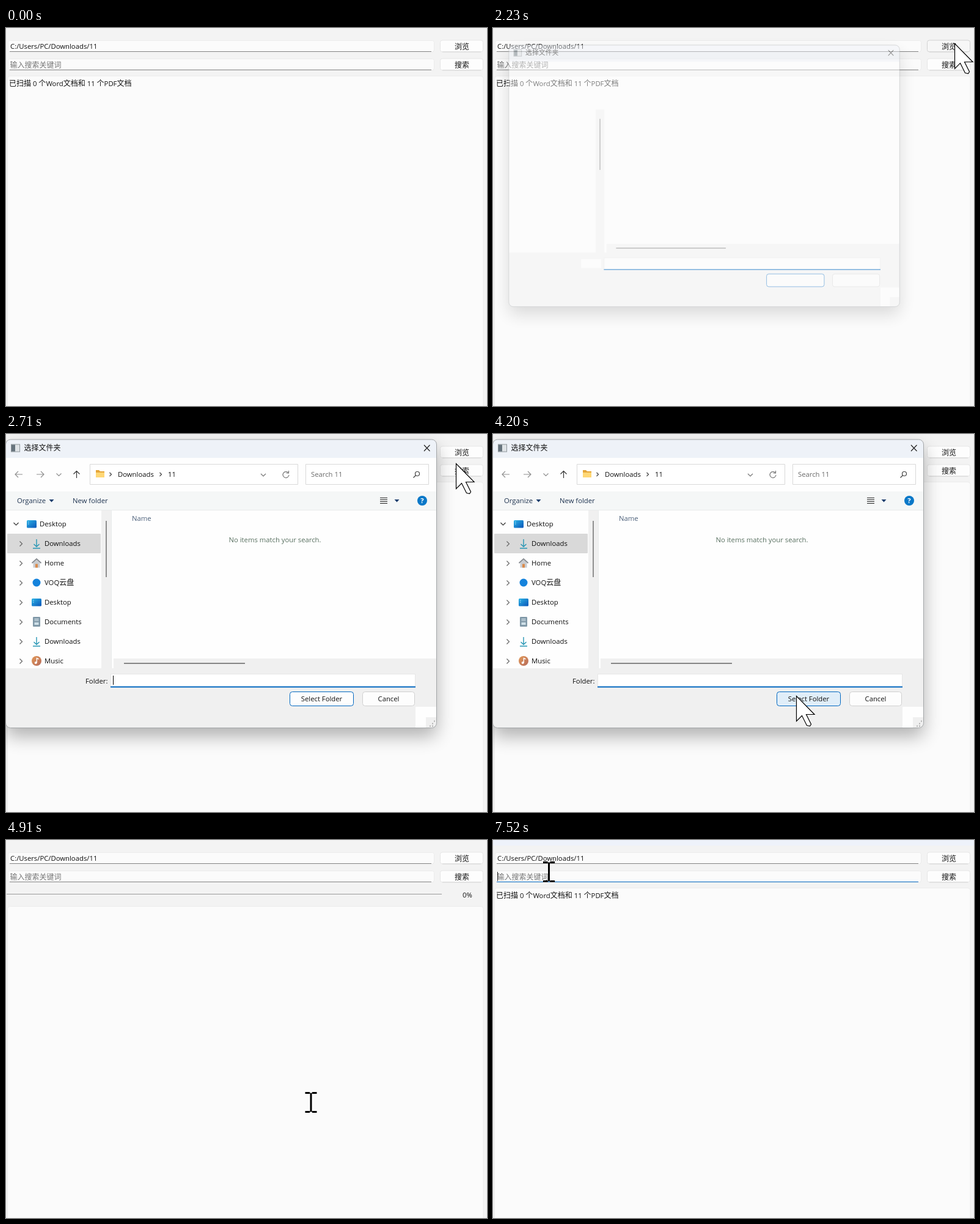
An HTML page for the animation above (8 s loop, 787 by 618 pixels).

```html
<!DOCTYPE html>
<html lang="zh-CN">
<head>
<meta charset="utf-8">
<title>文档搜索</title>
<style>
  html, body { margin: 0; width: 100%; height: 100%; overflow: hidden; background: #f3f3f3; }
  svg { display: block; }
  text { font: 11.3px "Open Sans", "Noto Sans", sans-serif; fill: #111; white-space: pre; }
  .cjk { font: 12px "Noto Sans CJK SC", "Noto Sans CJK", "Noto Sans CJK JP", sans-serif; }
  .mid { text-anchor: middle; }
  .line { fill: none; stroke-width: 1.2; }
  .field, .btn, #editor { fill: #fbfbfb; stroke: #ececec; }
  .btn { fill: #fdfdfd; stroke: #e6e6e6; }
  .btn.hover { fill: #f7f7f7; stroke: #d2d2d2; }
  .under { stroke: #868686; }
  .focus { stroke: #0067c0; }
</style>
</head>
<body>
<svg id="stage" width="787" height="618" viewBox="0 0 787 618">
  <defs>
    <filter id="blur" x="-20%" y="-20%" width="140%" height="140%"><feGaussianBlur stdDeviation="15"/></filter>
    <linearGradient id="blue" x2="1" y2="1"><stop stop-color="#2bb3e6"/><stop offset="1" stop-color="#0a55b8"/></linearGradient>
    <linearGradient id="warm" x2="1" y2="1"><stop stop-color="#e39a58"/><stop offset="1" stop-color="#b5695a"/></linearGradient>
    <clipPath id="frameClip"><rect x="-.5" y="9" width="705" height="471.5" rx="8"/></clipPath>
    <clipPath id="treeClip"><rect y="125" width="156" height="258"/></clipPath>
    <g id="desktop"><rect x="-8" y="-6" width="16" height="12.5" rx="1.5" fill="url(#blue)"/><path d="M-6-3h1.5M-6 0h1.5" stroke="#bfe9ff"/></g>
    <g id="download" fill="none" stroke="#2796b4" stroke-width="1.4"><path d="M0-7V5M-4.5 1 0 5.3 4.5 1M-6 7.7H6"/></g>
    <g id="home"><path d="M-5.5-1 0-6 5.5-1V7.5H-5.5Z" fill="#c9ccd0"/><path d="M-2 1.5H2V7.5H-2Z" fill="#d98a4b"/><path d="M-7.5 0 0-6.8 7.5 0" fill="none" stroke="#85898e" stroke-width="1.7"/></g>
    <circle id="cloud" r="6.5" fill="#1583dc"/>
    <g id="doc"><rect x="-6" y="-8" width="12" height="16" rx="1.2" fill="#8199a8"/><path d="M-3.5-4.5h7M-3.5-2h7" stroke="#e6f2f8"/><rect x="-3.5" y="1" width="7" height="4" fill="#cfe0e8"/></g>
    <g id="music"><circle r="8" fill="url(#warm)"/><path d="M.3 3V-4.5L3.5-3" fill="none" stroke="#fff" stroke-width="1.4"/><circle cx="-1.3" cy="3" r="2" fill="#fff"/></g>
  </defs>

  <rect width="787" height="618" fill="#f3f3f3"/>
  <rect id="strip" width="787" height="9" fill="#eef2fa"/>
  <rect class="field" x="3.5" y="20.5" width="697" height="18.5" rx="3"/>
  <path class="under" d="M6 38.5H696"/>
  <text x="7" y="34">C:/Users/PC/Downloads/11</text>
  <rect class="field" x="3.5" y="50.5" width="697" height="18.5" rx="3"/>
  <path id="query" class="under" d="M6 68.5H696"/>
  <text class="cjk" x="6.5" y="64.5" style="fill:#757575">输入搜索关键词</text>
  <path id="queryCaret" d="M7.5 52V67" stroke="#222"/>
  <rect id="browse" class="btn" x="710.5" y="20" width="70" height="19" rx="3.5"/>
  <text class="cjk mid" x="746" y="34.5">浏览</text>
  <rect class="btn" x="710.5" y="50" width="70" height="19" rx="3.5"/>
  <text class="cjk mid" x="746" y="64.5">搜索</text>
  <path d="M714 39H777M714 69H777" stroke="#d4d4d4"/>
  <g id="progress"><path d="M1 88.5H713" stroke="#9a9a9a"/><text x="747" y="94">0%</text></g>
  <rect id="editor" x="2.5" width="778.5" height="600" rx="4"/>
  <text id="result" x="5" y="95"><tspan class="cjk">已扫描</tspan> 0 <tspan class="cjk">个</tspan>Word<tspan class="cjk">文档和</tspan> 11 <tspan class="cjk">个</tspan>PDF<tspan class="cjk">文档</tspan></text>

  <g id="dialog">
    <rect x="0" y="23" width="704" height="471" rx="8" opacity=".3" filter="url(#blur)"/>
    <g clip-path="url(#frameClip)">
      <rect x="-1" y="9" width="706" height="472" fill="#fefefe"/>
      <rect x="-1" y="9" width="706" height="30" fill="#eef2f8"/>
      <path d="M156 125h16V383h-16ZM176 367H704V383H176ZM-1 383H705V446H670V481H-1ZM687 463h18v18h-18Z" fill="#f0f0f0"/>
      <path d="M164 142V234M193 375H391" stroke="#868686" stroke-width="1.8"/>
      <path d="M130 395h36v16h-36Z" fill="#fefefe"/>
    </g>
    <rect x="8.5" y="17" width="14" height="12" fill="#dfe3e6" stroke="#8f979c"/>
    <rect x="9" y="17.5" width="6" height="11" fill="#66737c"/>
    <text class="cjk" x="29.5" y="27">选择文件夹</text>
    <path class="line" d="M684 18 693.5 28M693.5 18 684 28" stroke="#222"/>
    <rect x="171.5" y="392.5" width="498" height="21" fill="#fff" stroke="#e6e6e6"/>
    <path id="folderLine" class="focus" d="M171 413.5H670" stroke-width="2"/>
    <rect id="select" x="464.5" y="421.5" width="104" height="23" rx="4" fill="#fdfdfd" stroke="#0067c0"/>
    <rect x="583.5" y="421.5" width="85" height="23" rx="4" fill="#fdfdfd" stroke="#d0d0d0"/>
    <g id="content">
      <rect x="0" y="94" width="704" height="30.5" fill="#f5f7f7"/>
      <path d="M0 124.5H704M172.5 125V383" stroke="#e9ebeb"/>
      <g class="line">
        <path d="M27 66H15.5M20 61 15 66l5 5M50 66H61.5M57 61l5 5-5 5M82.5 64.5l4 4 4-4" stroke="#909090"/>
        <path d="M115.500 72V60.500M110.500 65.500l5-5 5 5" stroke="#333"/>
      </g>
      <path d="M137.500 49.500h340v33h-340ZM490.500 49.500h201v33h-201Z" fill="#fff" stroke="#d9d9d9"/>
      <path d="M147 59h5l2 2h7v10h-14Z" fill="#e5a63a"/><path d="M147 63h14v8h-14Z" fill="#ffd775"/>
      <g class="line" stroke="#444">
        <path d="M169.500 63l3 3-3 3M251.500 63l3 3-3 3"/>
        <path d="M417 65l4 4 4-4M462 63.500a5 5 0 1 0 1 3.500M462.500 60v4h-4" stroke="#777"/>
        <circle cx="673" cy="65" r="3.500"/><path d="M670.500 67.500 666.500 71.500"/>
      </g>
      <text x="183" y="70">Downloads</text><text x="265" y="70">11</text>
      <text x="499" y="70" style="fill:#6b6b6b">Search 11</text>
      <text x="18" y="113" style="fill:#1e3350">Organize</text>
      <text x="109" y="113" style="fill:#1e3350">New folder</text>
      <path d="M70.500 107h8l-4 4.500ZM635.500 107h8l-4 4.500Z" fill="#1e3f6e"/>
      <path d="M612 104.500h12M612 107.500h12M612 110.500h12M612 113.500h12" stroke="#222"/>
      <circle cx="681" cy="109" r="8" fill="#0a78c8"/>
      <text class="mid" x="681" y="113" style="fill:#fff;font-weight:700">?</text>
      <text x="206" y="142" style="fill:#4c607a">Name</text>
      <text class="mid" x="440" y="177" style="fill:#587060">No items match your search.</text>
      <g clip-path="url(#treeClip)">
        <rect x="2" y="163" width="153" height="32" rx="1" fill="#d9d9d9"/>
        <path class="line" d="M12.500 145l4 4 4-4" stroke="#333"/>
        <use href="#desktop" x="42" y="147"/><text x="55" y="151">Desktop</text>
        <g id="tree"></g>
      </g>
      <path d="M129 394h38v18h-38Z" fill="#f0f0f0"/>
      <text x="130" y="408">Folder:</text>
      <text class="mid" x="516.500" y="437">Select Folder</text>
      <text class="mid" x="626" y="437">Cancel</text>
      <path d="M693 477.500h8M697 473.500h4M700 469.500h2" stroke="#b0b0b0" stroke-width="2" stroke-dasharray="2"/>
      <path id="folderCaret" d="M175.500 395V410" stroke="#000"/>
    </g>
    <rect x="-.5" y="9" width="705" height="471.5" rx="8" fill="none" stroke="#a3a6a8"/>
  </g>

  <path id="arrow" d="M.5.5V41.500L9.500 32.500 17.500 48.500 22.500 49.500 24.500 46.500 16.500 30.500H30Z" fill="#fff" stroke="#000" stroke-width="1.2"/>
  <path id="beam" d="M-9.500-17H-2V-14H-9.500ZM2-17H9.500V-14H2ZM-2-15.500H2L1.500-14V14L2 15.500H-2L-1.500 14V-14ZM-9.500 14H-2V17H-9.500ZM2 14H9.500V17H2Z"/>
</svg>
<script>
const LOOP = 8000;
const $ = id => document.getElementById(id);
const within = (t, a, b) => t >= a && t < b;
const show = (id, on) => $(id).setAttribute('visibility', on ? 'inherit' : 'hidden');
const lerp = (a, b, p) => a + (b - a) * p;

const rows = [['download', 'Downloads'], ['home', 'Home'], ['cloud', 'VOQ<tspan class="cjk">云盘</tspan>'],
  ['desktop', 'Desktop'], ['doc', 'Documents'], ['download', 'Downloads'], ['music', 'Music']];
$('tree').innerHTML = rows.map(([icon, label], i) => {
  const y = 179 + i * 32;
  return `<path class="line" d="M22.500 ${y - 3.5}l4 4-4 4" stroke="#666"/>
    <use href="#${icon}" x="50" y="${y}"/><text x="63" y="${y + 4}">${label}</text>`;
}).join('');

// Pointer moves: start, end, number of steps, shape, way points
const moves = [
  [330, 750, 7, 'arrow', [[779, 489], [772, 250], [762, 90], [758, 36]]],
  [920, 940, 2, 'arrow', [[756, 30], [755, 25]]],
  [1110, 1110, 1, 'beam', [[724, 19]]],
  [1190, 1190, 1, 'arrow', [[755, 25]]],
  [1640, 1640, 1, 'beam', [[755, 25]]],
  [1970, 1970, 1, 'arrow', [[755, 25]]],
  [2710, 2710, 1, 'arrow', [[736, 48]]],
  [2920, 3690, 13, 'arrow', [[732, 70], [690, 240], [640, 400], [585, 458], [525, 450], [496, 428]]],
  [4910, 4910, 1, 'beam', [[499, 429]]],
  [6240, 6580, 6, 'beam', [[480, 405], [300, 240], [130, 115]]],
  [6650, 6650, 1, 'arrow', [[98, 79]]],
  [6950, 6950, 1, 'beam', [[95, 60]]],
  [6990, 6990, 1, 'beam', [[91.5, 53]]],
  [7190, 7190, 1, 'beam', [[91.5, 52]]]
];

// Dialog states: time, scale, opacity
const poses = [
  [0, 1, 0], [2230, .907, .45], [2297, .955, .75], [2365, .985, .92], [2432, 1, 1],
  [4540, .975, .7], [4615, .94, .35], [4690, .92, 0]
];

const last = (table, t) => table.filter(row => row[0] <= t).pop();

function along(points, p) {
  const pos = p * (points.length - 1);
  const i = Math.min(Math.floor(pos), points.length - 2);
  if (i < 0) return points[0];
  return [0, 1].map(k => lerp(points[i][k], points[i + 1][k], pos - i));
}

function pointer(t) {
  const move = last(moves, t);
  show('arrow', move && move[3] === 'arrow');
  show('beam', move && move[3] === 'beam');
  if (!move) return;
  const [start, end, steps, shape, points] = move;
  let p = 1;
  if (t < end) {
    p = Math.floor((t - start) / (end - start) * (steps - 1)) / (steps - 1);
    p = p * p * (3 - 2 * p);
  }
  const [x, y] = along(points, p).map(v => Math.round(v * 2) / 2);
  $(shape).setAttribute('transform', `translate(${x} ${y})`);
}

function dialog(t) {
  const [, scale, alpha] = last(poses, t);
  const k = (1 - scale) / .093;
  show('dialog', alpha > 0);
  $('dialog').setAttribute('opacity', alpha);
  $('dialog').setAttribute('transform', `translate(${26.3 * k} ${19.8 * k}) scale(${scale})`);
  show('content', alpha > 0 && t >= 2432);
  $('folderCaret').style.opacity = within(t, 2432, 3140) || within(t, 3670, 4200) ? 1 : 0;
  $('folderLine').setAttribute('class', t < 4400 ? 'focus' : 'under');
  $('select').setAttribute('fill', t < 3690 ? '#fdfdfd' : t < 4400 ? '#e0eef9' : '#cce4f7');
}

function draw(t) {
  const scanning = within(t, 4890, 6910);
  show('strip', t >= 6240);
  show('progress', scanning);
  show('result', !scanning);
  $('editor').setAttribute('y', scanning ? 108.5 : 78.5);
  $('browse').setAttribute('class', within(t, 920, 2300) ? 'btn hover' : 'btn');
  $('query').setAttribute('class', t >= 7450 ? 'focus' : 'under');
  show('queryCaret', t >= 7450);
  dialog(t);
  pointer(t);
}

const begin = performance.now();
function tick() {
  draw((performance.now() - begin) % LOOP);
  requestAnimationFrame(tick);
}
tick();
</script>
</body>
</html>
```
